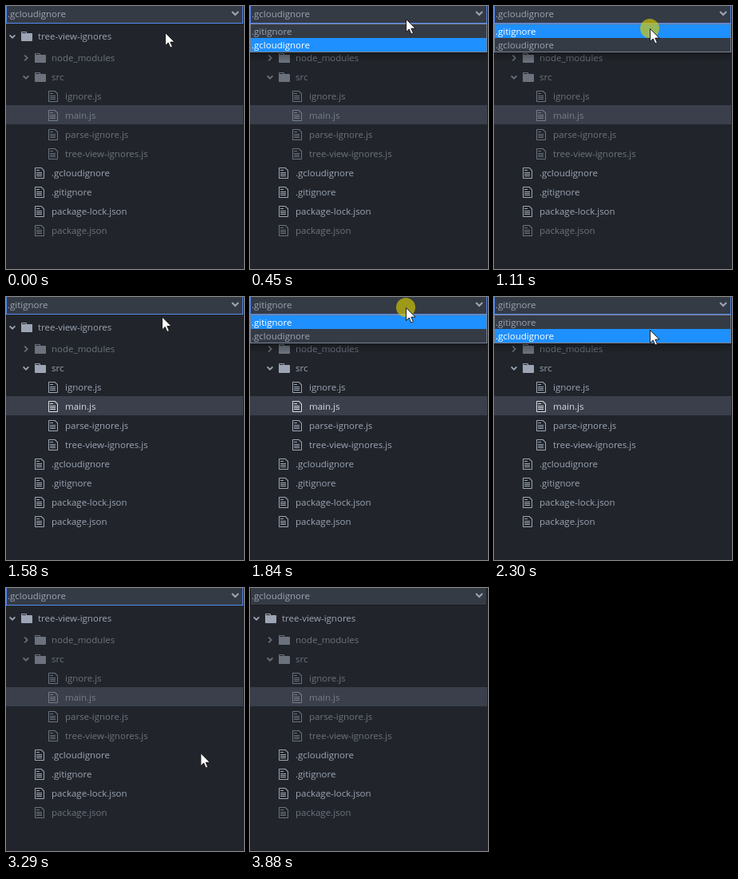
Animation, 298 px wide and 329 px high, one loop 3.95 s. Source, as an HTML page:

```html
<!DOCTYPE html>
<html lang="en">
<head>
<meta charset="utf-8">
<title>Tree view ignores</title>
<style>
  html, body { margin: 0; width: 100%; height: 100%; overflow: hidden; background: #21252b; }
  svg { display: block; font: 11.5px "Open Sans", "Noto Sans", sans-serif; }
  .row { color: #9da5b4; fill: currentColor; }
  .row.picked { color: #d7dae0; }
  .row.dim { opacity: .6; }
  .arrow { fill: none; stroke: currentColor; stroke-width: 1.7; }
  .label { fill: #9da5b4; }
  .hot rect { fill: #1e90ff; }
  .hot text { fill: #fff; }
</style>
</head>
<body>
<svg width="298" height="329" viewBox="0 0 298 329">
  <defs>
    <linearGradient id="shade" x2="0" y2="1">
      <stop stop-color="#000" stop-opacity=".3"/>
      <stop offset="1" stop-color="#000" stop-opacity="0"/>
    </linearGradient>
    <path id="folder" d="M13 4H7V3c0-.66-.31-1-1-1H1c-.55 0-1 .45-1 1v10c0 .55.45 1 1 1h12c.55 0 1-.45 1-1V5c0-.55-.45-1-1-1zM6 4H1V3h5z"/>
    <path id="file" d="M6 5H2V4h4zM2 8h7V7H2zm0 2h7V9H2zm0 2h7v-1H2zm10-7.5V14c0 .55-.45 1-1 1H1c-.55 0-1-.45-1-1V2c0-.55.45-1 1-1h7.5zM11 5 8 2H1v12h10z"/>
  </defs>
  <rect width="298" height="329" fill="#21252b"/>
  <rect y="124" width="297" height="24" fill="#3a3f4b"/>
  <g id="tree"></g>
  <rect id="box" x=".5" y="-.5" width="296" height="22" fill="#353b45"/>
  <text id="value" class="label" x="2" y="14"></text>
  <path d="M283 7l4 4 4-4" fill="none" stroke="#9da5b4" stroke-width="2"/>
  <g id="list">
    <rect y="58" width="297" height="12" fill="url(#shade)"/>
    <rect x=".5" y="22.5" width="296" height="35" fill="#353b45" stroke="#7a8190"/>
    <g id="git"><rect x="1" y="23" width="295" height="17" fill="none"/><text class="label" x="2" y="36">.gitignore</text></g>
    <g id="cloud"><rect x="1" y="40" width="295" height="17" fill="none"/><text class="label" x="2" y="53">.gcloudignore</text></g>
  </g>
  <g id="pointer">
    <circle id="click" r="12" fill="#d7cd00" opacity=".65"/>
    <path d="M.5.5v16l3.7-3.5 2.6 6 2.6-1.1-2.6-5.8h5.2z" fill="#fff" stroke="#111" stroke-width=".9"/>
  </g>
</svg>
<script>
const $ = id => document.getElementById(id);
const LOOP = 3950, TICK = LOOP / 60;

// name, icon x, center y, icon, ignored by: c = .gcloudignore, g = .gitignore
const rows = [
  ['tree-view-ignores', 19, 38, 'folder', ''],
  ['node_modules', 36, 65, 'folder', 'cg'],
  ['src', 36, 89, 'folder', 'c'],
  ['ignore.js', 53, 113, 'file', 'c'],
  ['main.js', 53, 137, 'file', 'c'],
  ['parse-ignore.js', 53, 161, 'file', 'c'],
  ['tree-view-ignores.js', 53, 185, 'file', 'c'],
  ['.gcloudignore', 36, 209, 'file', ''],
  ['.gitignore', 36, 233, 'file', ''],
  ['package-lock.json', 36, 257, 'file', ''],
  ['package.json', 36, 281, 'file', 'c']
];

function rowMarkup([name, x, y, icon]) {
  const turn = name === 'node_modules' ? -90 : 0;
  const arrow = icon === 'file' ? '' :
    `<path class="arrow" d="M-3.4-1.7 0 1.7l3.4-3.4" transform="translate(${x - 11} ${y}) rotate(${turn})"/>`;
  return `<g class="row">${arrow}<use href="#${icon}" x="${x}" y="${y - 8}"/>` +
    `<text x="${x + 21}" y="${y + 4}">${name}</text></g>`;
}
$('tree').innerHTML = rows.map(rowMarkup).join('');
const rowNodes = [...$('tree').children];

// pointer path: time, x, y
const path = [
  [0, 199, 33], [200, 195, 16], [600, 195, 16], [770, 195, 28],
  [1520, 195, 28], [1770, 195, 13], [1850, 195, 13], [2100, 195, 24],
  [2110, 195, 24], [2300, 195, 41], [2970, 195, 41], [3200, 222, 128], [3423, 274, 318]
];

function pointerAt(t) {
  const i = path.findIndex(k => k[0] > t);
  if (i < 0) return path[path.length - 1].slice(1);
  const [t0, x0, y0] = path[i - 1], [t1, x1, y1] = path[i];
  const p = (t - t0) / (t1 - t0);
  return [x0 + (x1 - x0) * p, y0 + (y1 - y0) * p];
}

const within = (t, ...spans) => spans.some(([a, b]) => t >= a && t < b);
const show = (id, on) => $(id).setAttribute('visibility', on ? 'visible' : 'hidden');

function render(t) {
  const git = within(t, [1180, 2690]);
  const cloudHot = t < 710 || t >= 2230;
  $('value').textContent = git ? '.gitignore' : '.gcloudignore';
  $('box').setAttribute('stroke', t >= 3880 ? '#181a1f' : '#568af2');
  rows.forEach(([name, , , , by], i) => {
    const state = by.includes(git ? 'g' : 'c') ? 'dim' : name === 'main.js' ? 'picked' : '';
    rowNodes[i].setAttribute('class', 'row ' + state);
  });

  show('list', within(t, [380, 1180], [1840, 2690]));
  $('git').setAttribute('class', cloudHot ? '' : 'hot');
  $('cloud').setAttribute('class', cloudHot ? 'hot' : '');

  const [x, y] = pointerAt(Math.floor((t + 12) / TICK) * TICK);
  $('pointer').setAttribute('transform', `translate(${x} ${y})`);
  $('pointer').style.display = t < 3485 ? '' : 'none';
  show('click', within(t, [320, 450], [1110, 1240], [1780, 1900], [2630, 2690]));
}

const start = performance.now();
function frame() {
  render((performance.now() - start) % LOOP);
  requestAnimationFrame(frame);
}
frame();
</script>
</body>
</html>
```
